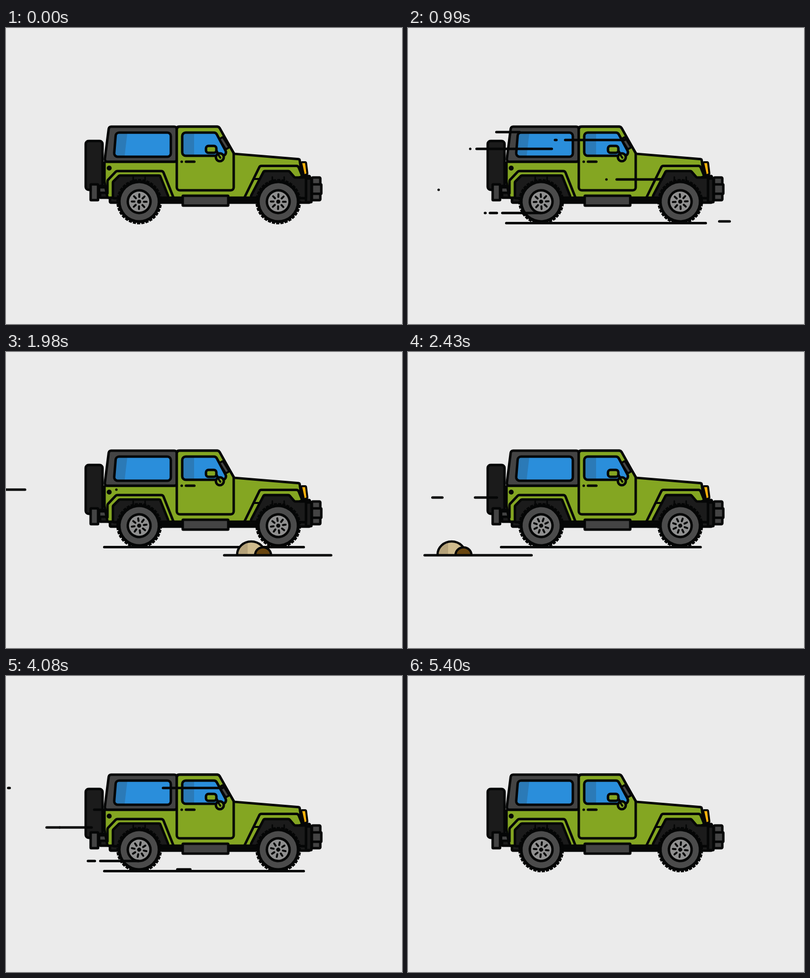
An HTML page with a canvas for the animation above (5.43 s loop, 800 px wide and 600 px high).

```html
<!DOCTYPE html>
<html lang="en">
<head>
<meta charset="utf-8">
<title>Off-road drive</title>
<style>
html, body { margin: 0; width: 100%; height: 100%; overflow: hidden; background: #ebebeb; }
canvas { display: block; }
</style>
</head>
<body>
<canvas id="stage" width="800" height="600"></canvas>
<script>
const ctx = document.getElementById('stage').getContext('2d');
const CYCLE = 2715, REAR = 269, FRONT = 550;
const INK = '#050606', DARK = '#1b1b1b', GREY = '#444444', GREEN = '#84a622';
const BLUE = '#2a8edb', SHADE = '#2b7ab7';

const ramp = (t, a, b) => Math.min(1, Math.max(0, (t - a) / (b - a)));
const mix = (a, b, p) => a + (b - a) * p;
const easeOut = p => 1 - (1 - p) * (1 - p);
// distance covered after leaving at time a with steady acceleration
const leave = (t, a) => 0.008 * Math.max(0, t - a) ** 2;

function paint(fill, width = 5) {
  if (fill) { ctx.fillStyle = fill; ctx.fill(); }
  if (width) { ctx.lineWidth = width; ctx.strokeStyle = INK; ctx.stroke(); }
}

// closed polygon with rounded corners
function poly(pts, r, fill, width) {
  const n = pts.length, [a, b] = [pts[0], pts[n - 1]];
  ctx.beginPath();
  ctx.moveTo((a[0] + b[0]) / 2, (a[1] + b[1]) / 2);
  pts.forEach((p, i) => ctx.arcTo(...p, ...pts[(i + 1) % n], r));
  ctx.closePath();
  paint(fill, width);
}

function box(x, y, w, h, r, fill, width) {
  poly([[x, y], [x + w, y], [x + w, y + h], [x, y + h]], r, fill, width);
}

function path(pts, r = 0, width = 5) {
  const last = pts.length - 1;
  ctx.beginPath();
  ctx.moveTo(...pts[0]);
  for (let i = 1; i < last; i++) ctx.arcTo(...pts[i], ...pts[i + 1], r);
  ctx.lineTo(...pts[last]);
  paint(null, width);
}

function disc(x, y, r, fill, width = 0) {
  ctx.beginPath();
  ctx.arc(x, y, r, 0, 7);
  paint(fill, width);
}

// horizontal round-ended stroke spanning l..r
function dash(y, l, r) {
  if (r - l < 1) return;
  const c = Math.min(2.5, (r - l) / 2);
  path([[l + c, y], [r - c + 0.01, y]], 0, c * 2);
}

// pane with a darker strip along its left side
function glass(pts, x, slant) {
  poly(pts, 7, BLUE, 0);
  ctx.save();
  ctx.clip();
  poly([[200, 205], [x, 205], [x - slant, 265], [200, 265]], 0, SHADE, 0);
  ctx.restore();
  poly(pts, 7, null);
}

function wheel(x, angle) {
  const teeth = 32, spokes = 8;
  ctx.save();
  ctx.translate(x, 352);
  ctx.rotate(angle);
  disc(0, 0, 43.5, INK);
  for (let i = 0; i < teeth; i++) {
    ctx.rotate(2 * Math.PI / teeth);
    ctx.fillRect(-3.2, -46, 6.4, 5);
  }
  disc(0, 0, 37.5, '#4b4b4b');
  disc(0, 0, 25.5, INK);
  disc(0, 0, 20.5, '#8f8f8f');
  for (let i = 0; i < spokes; i++) {
    ctx.rotate(2 * Math.PI / spokes);
    path([[0, -9.5], [0, -15]], 0, 4);
  }
  disc(0, 0, 4, INK);
  ctx.restore();
}

function chassis() {
  box(161, 229, 34, 99, 6, DARK);
  box(190, 320, 20, 24, 1, DARK);
  box(188, 323, 16, 11, 1, GREY);
  box(171, 317, 15, 32, 1, GREY);
  box(210, 300, 404, 54, 2, DARK);
  path([[315, 351], [506, 351]], 0, 9);
  box(606, 305, 11, 48, 1, DARK);
  box(618, 303, 17, 46, 2, GREY);
  box(618, 317, 19, 19, 1, GREY);
}

function arches() {
  poly([[216, 345], [216, 312], [229, 299], [311, 299], [329, 344]], 3, DARK);
  path([[205, 335], [205, 309], [223, 290], [317, 290], [338, 343]], 5);
  poly([[493, 344], [521, 290], [572, 290], [583, 303], [606, 303], [606, 345]], 3, DARK);
  path([[482, 343], [513, 279.5], [590, 279.5], [598, 299]], 5);
  path([[501, 306], [511, 306]], 0, 4);
  for (const x of [REAR, FRONT]) {
    path([[x - 12, 302], [x - 12, 309]], 0, 3);
    path([[x + 12, 302], [x + 12, 309]], 0, 3);
  }
}

function body() {
  poly([[199, 271], [345, 271], [345, 200], [429, 200], [461, 255], [593, 266],
    [598, 301], [493, 344], [205, 344], [199, 312]], 3, GREEN);
  poly([[199, 271], [208, 200], [345, 200], [345, 271]], 5, GREY);
  glass([[222, 212], [333, 212], [333, 261], [218, 261]], 246, 7);
  disc(208.5, 284, 5, INK);
  arches();

  poly([[345, 200], [430, 200], [460, 254], [460, 329], [345, 329]], 6, GREEN);
  glass([[356, 212], [424, 212], [449, 259], [356, 259]], 380, 0);
  poly([[431, 225], [438, 221], [451, 242], [444, 246]], 1, GREY, 4);
  path([[424, 247], [432, 261]]);
  disc(432, 262, 8, GREEN, 5);
  path([[429, 257], [433, 263]], 0, 4);
  box(404, 239, 21, 14, 5, GREEN);
  disc(355, 271, 2.6, INK);
  dash(271, 361, 383);

  poly([[596, 272], [606, 272], [609, 296], [602, 299]], 2, '#ffb20a', 4);
  box(357, 340, 92, 20, 1, GREY);
}

function car(t) {
  // each axle hops over the bump in the road
  const hop = c => 4 * Math.cos(Math.PI / 2 * Math.min(1, Math.abs(t - c) / 70)) ** 2;
  const rear = hop(1487), slope = (rear - hop(1111)) / (FRONT - REAR);
  const angle = t / CYCLE * 10.25 * 2 * Math.PI;
  ctx.save();
  ctx.transform(1, slope, 0, 1, 0, -rear - slope * REAR);
  chassis();
  body();
  wheel(REAR, angle);
  wheel(FRONT, angle);
  ctx.restore();
}

function ground(t) {
  const off = leave(t, 2395);
  dash(395.5, mix(604, 196, easeOut(ramp(t, 30, 330))) - off, 604 - off);
  if (t > 823 && t < 1720) {
    const l = 753 - (t - 823) * 0.754;
    dash(392, Math.max(172, l), Math.min(753, l + 26 + (t - 990) * 0.014));
  }
}

function stone(x, rx, ry, fill, shade) {
  ctx.beginPath();
  ctx.ellipse(x, 411, rx, ry, 0, Math.PI, 0);
  paint(fill, 0);
  if (shade) {
    ctx.save();
    ctx.clip();
    box(x - rx, 380, rx * 0.75, 32, 0, shade, 0);
    ctx.restore();
  }
  ctx.beginPath();
  ctx.ellipse(x, 411, rx, ry, 0, Math.PI, 0);
  paint(null, 4.5);
}

function stones(t) {
  const x = 33 + (2430 - t) * 0.905 - leave(t, 2430) / 16;
  if (x > 802 || x < -222) return;
  ctx.save();
  ctx.translate(x, 0);
  stone(56, 28.5, 27, '#cfbb8d', '#b5a27a');
  stone(80, 16, 15, '#694610');
  dash(412, -1, 220);
  ctx.restore();
}

// grows leftwards from r to l, sheds a small piece ahead, then shoots off
function streak(t, { y, l, r, grow, go, tip = 5 }) {
  const [t0, t1] = grow, off = leave(t, go);
  dash(y, mix(r, l, ramp(t, t0, t1)) - off, r - off);
  if (t > t1) {
    const x = l - 12 - (t - t1) * 0.78;
    dash(y, x, x + tip);
  }
}

const STREAKS = [
  { y: 211, l: 176, r: 228, grow: [404, 515], go: 1000 },
  { y: 245, l: 136, r: 293, grow: [397, 990], go: 995 },
  { y: 328, l: 484, r: 535, grow: [380, 462], go: 465 },
  { y: 227, l: 315, r: 440, grow: [830, 980], go: 1360, tip: 8 },
  { y: 307, l: 419, r: 515, grow: [830, 980], go: 1160 },
  { y: 271, l: 130, r: 202, grow: [1257, 1556], go: 1580 },
  { y: 279, l: 440, r: 545, grow: [1450, 1715], go: 1730 },
  { y: 295, l: 133, r: 182, grow: [2200, 2336], go: 2430, tip: 25 }
];

// broken streak under the car: uncovered leftwards, then wiped from its tail
function lowStreak(t) {
  const edge = mix(270, 153, ramp(t, 600, 930)) + leave(t, 1190) * 0.03;
  for (const [l, r] of [[153, 159], [163, 182], [188, 270]]) dash(375, Math.max(l, edge), r);
}

function frame(t) {
  ctx.fillStyle = '#ebebeb';
  ctx.fillRect(0, 0, 800, 600);
  ctx.lineCap = ctx.lineJoin = 'round';
  ground(t);
  car(t);
  stones(t);
  for (const s of STREAKS) streak(t, s);
  lowStreak(t);
}

const start = performance.now();
function tick() {
  frame((performance.now() - start) % CYCLE);
  requestAnimationFrame(tick);
}
tick();
</script>
</body>
</html>
```
